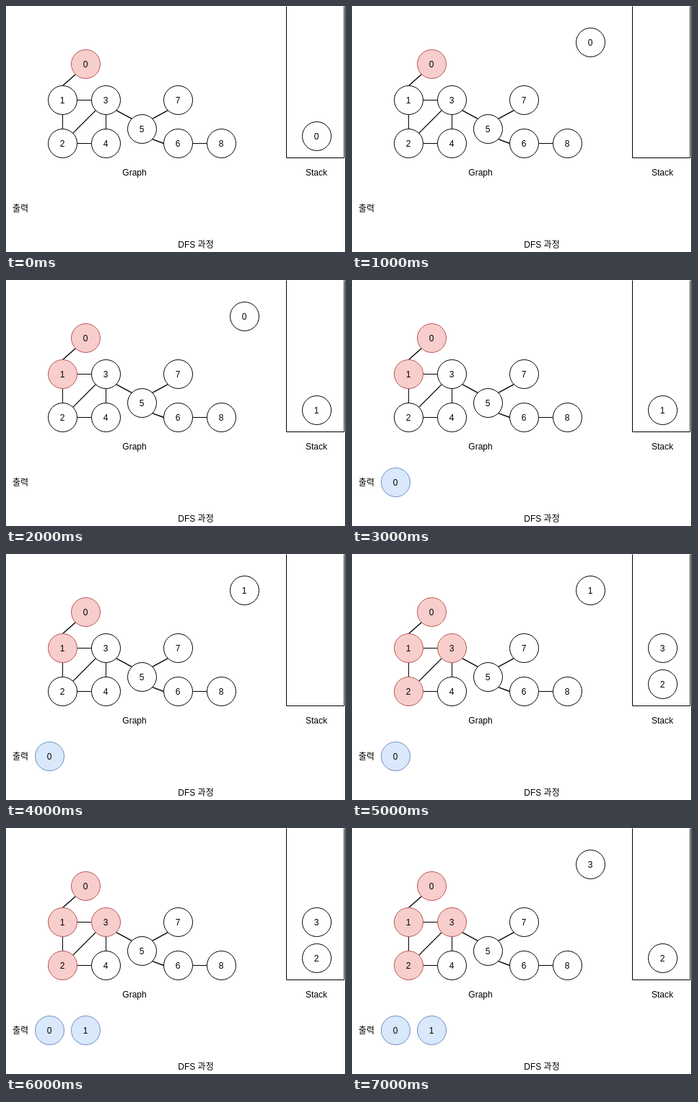
An HTML page that plays this animation: 471x341 px, repeating every 8000 ms.

```html
<!DOCTYPE html>
<html lang="ko">
<head>
<meta charset="utf-8">
<title>DFS 과정</title>
<style>
  html, body { margin: 0; width: 100%; height: 100%; overflow: hidden; background: #fff; }
  svg { display: block; }
  text { font: 12px "Liberation Sans", "Noto Sans CJK KR", "Noto Sans CJK", sans-serif; text-anchor: middle; }
  path, line { fill: none; stroke: #000; }
  .slanted { stroke-width: 1.35; }
  .plain { fill: #fff; stroke: #000; }
  .visited { fill: #f8cecc; stroke: #b85450; }
  .output { fill: #dae8fc; stroke: #6c8ebf; }
</style>
</head>
<body>
<svg id="stage" width="471" height="341" viewBox="0 0 471 341">
  <path d="M388.5 .5V210.5H468.5V.5M470.5 0V341"/>
  <text x="178" y="235">Graph</text>
  <text x="430" y="235">Stack</text>
  <text x="20" y="285">출력</text>
  <text x="263" y="335">DFS 과정</text>
</svg>
<script>
const STEP = 1000, STEPS = 8, R = 20;
const stage = document.getElementById('stage');

const nodes = [[110, 80], [78, 130], [78, 190], [138, 130], [138, 190],
  [188, 170], [238, 190], [238, 130], [298, 190]];
// Each edge joins two nodes at compass points of their circles
const edges = '0sw-1n 1e-3w 1s-2n 3sw-2ne 3s-4n 2e-4w 3se-5nw 5ne-7sw 5se-6w 6e-8w'
  .split(' ').map(edge => edge.split('-'));

function add(parent, tag, attrs = {}) {
  const el = document.createElementNS('http://www.w3.org/2000/svg', tag);
  for (const key in attrs) el.setAttribute(key, attrs[key]);
  return parent.appendChild(el);
}

function drawNode(parent, label, x, y, look) {
  add(parent, 'circle', { cx: x + 0.5, cy: y + 0.5, r: R, class: look });
  add(parent, 'text', { x, y: y + 5 }).textContent = label;
}

function port([id, ...dirs]) {
  const has = dir => Number(dirs.includes(dir));
  const dx = has('e') - has('w'), dy = has('s') - has('n');
  const scale = R / Math.hypot(dx, dy), [x, y] = nodes[id];
  return [x + 0.5 + dx * scale, y + 0.5 + dy * scale];
}

function drawEdge([from, to]) {
  const [x1, y1] = port(from), [x2, y2] = port(to);
  const look = x1 === x2 || y1 === y2 ? '' : 'slanted';
  add(stage, 'line', { x1, y1, x2, y2, class: look });
}

function neighbours(id) {
  const pairs = edges.map(ends => ends.map(end => Number(end[0])));
  return pairs.filter(pair => pair.includes(id))
    .map(([a, b]) => (a === id ? b : a)).sort();
}

// Run the search: pop a node, push its unvisited neighbours, output it
const visited = new Set([0]), stack = [0], output = [];
let held = null;

function advance(step) {
  const phase = step % 3;
  if (phase === 1) {
    held = stack.pop();
  } else if (phase === 2) {
    for (const id of neighbours(held)) {
      if (!visited.has(id)) stack.push(id);
      visited.add(id);
    }
  } else if (held !== null) {
    output.push(held);
    held = null;
  }
}

function snapshot() {
  const g = add(stage, 'g');
  nodes.forEach(([x, y], id) => drawNode(g, id, x, y, visited.has(id) ? 'visited' : 'plain'));
  stack.forEach((id, i) => drawNode(g, id, 430, 180 - 50 * i, 'plain'));
  output.forEach((id, i) => drawNode(g, id, 60 + 50 * i, 280, 'output'));
  if (held !== null) drawNode(g, held, 330, 50, 'plain');
  return g;
}

edges.forEach(drawEdge);
const scenes = Array.from({ length: STEPS }, (_, step) => {
  advance(step);
  return snapshot();
});

function draw() {
  const step = Math.floor(performance.now() / STEP) % STEPS;
  scenes.forEach((g, i) => { g.style.display = i === step ? '' : 'none'; });
  requestAnimationFrame(draw);
}
draw();
</script>
</body>
</html>
```
